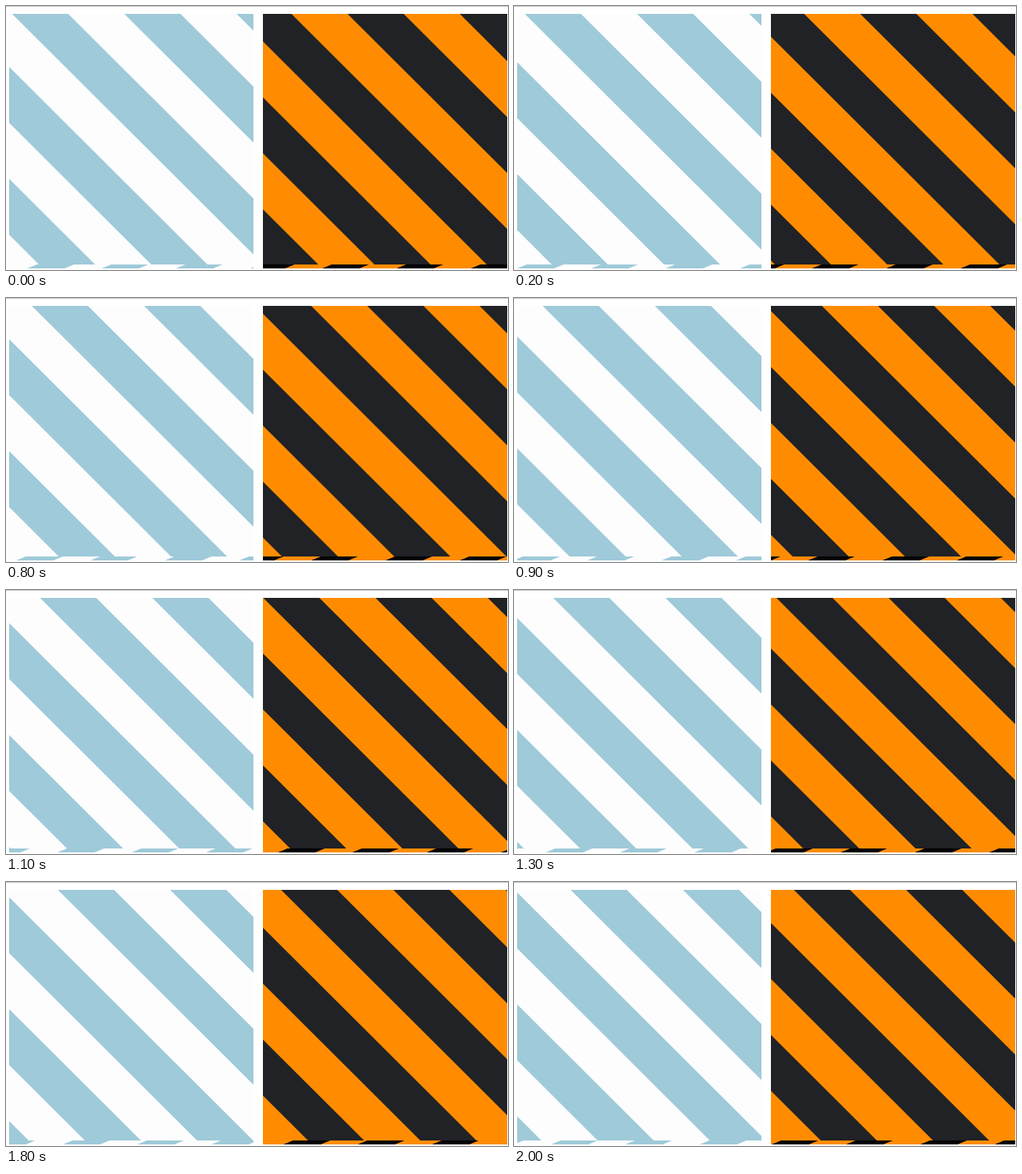
Write an HTML page with a canvas that moves like this. It is 635x335 px and loops after 2100 ms.

```html
<!DOCTYPE html>
<html lang="en">
<head>
<meta charset="utf-8">
<title>Diagonal stripes</title>
<style>
  html, body { margin: 0; width: 635px; height: 335px; overflow: hidden; background: #fff; }
  canvas { display: block; }
</style>
</head>
<body>
<canvas id="stage" width="635" height="335"></canvas>
<script>
const ctx = document.getElementById('stage').getContext('2d');
const LOOP = 2100, STEP = 100;
const TOP = 10, SPLIT = 328, BOTTOM = 333, PANEL_W = 309;

// time in ms, shift of the large stripes, shift of the bottom strip
const path = [
  [0, 0, 0], [500, 15, -58], [800, 25, -108], [1100, 35.4, -150],
  [1500, 48.3, -200], [1800, 58, -237], [2000, 64, -262]
];

// x is the left edge of one stripe along the top, edge that of one strip band along its base
const panels = [
  { left: 4, x: 7.7, edge: 27, back: '#fdfdfe', fill: '#9fcad9', stripBack: '#fdfdfe' },
  { left: 325, x: 361, edge: 353, back: '#212225', fill: '#ff8c00', stripBack: '#000' }
];

function shiftAt(t, col) {
  let i = 1;
  while (i < path.length - 1 && t > path[i][0]) i++;
  const a = path[i - 1], b = path[i];
  return a[col] + (b[col] - a[col]) * (t - a[0]) / (b[0] - a[0]);
}

// Fills a box with slanted bands; lean is the x offset from top to bottom
function bands(left, top, bottom, x, period, lean, back, fill) {
  const width = period / 2, right = left + PANEL_W;
  ctx.save();
  ctx.beginPath();
  ctx.rect(left, top, PANEL_W, bottom - top);
  ctx.clip();
  ctx.fillStyle = back;
  ctx.fillRect(left, top, PANEL_W, bottom - top);
  ctx.fillStyle = fill;
  const reach = Math.abs(lean) + period;
  const first = x - Math.ceil((x - left + reach) / period) * period;
  for (let s = first; s < right + reach; s += period) {
    ctx.beginPath();
    ctx.moveTo(s, top);
    ctx.lineTo(s + width, top);
    ctx.lineTo(s + width + lean, bottom);
    ctx.lineTo(s + lean, bottom);
    ctx.fill();
  }
  ctx.restore();
}

function draw(t) {
  const slide = shiftAt(t, 1), drift = shiftAt(t, 2);
  ctx.fillStyle = '#fff';
  ctx.fillRect(0, 0, 635, 335);
  ctx.fillStyle = '#c4c4c8';
  ctx.fillRect(0, 0, 635, 1);
  for (const p of panels) {
    bands(p.left, TOP, SPLIT, p.x + slide, 142, SPLIT - TOP, p.back, p.fill);
    bands(p.left, SPLIT, BOTTOM, p.edge + 12 + drift, 94, -12, p.stripBack, p.fill);
  }
}

const start = performance.now();
function tick() {
  const t = (performance.now() - start) % LOOP;
  draw(Math.floor(t / STEP) * STEP);
  requestAnimationFrame(tick);
}
tick();
</script>
</body>
</html>
```
